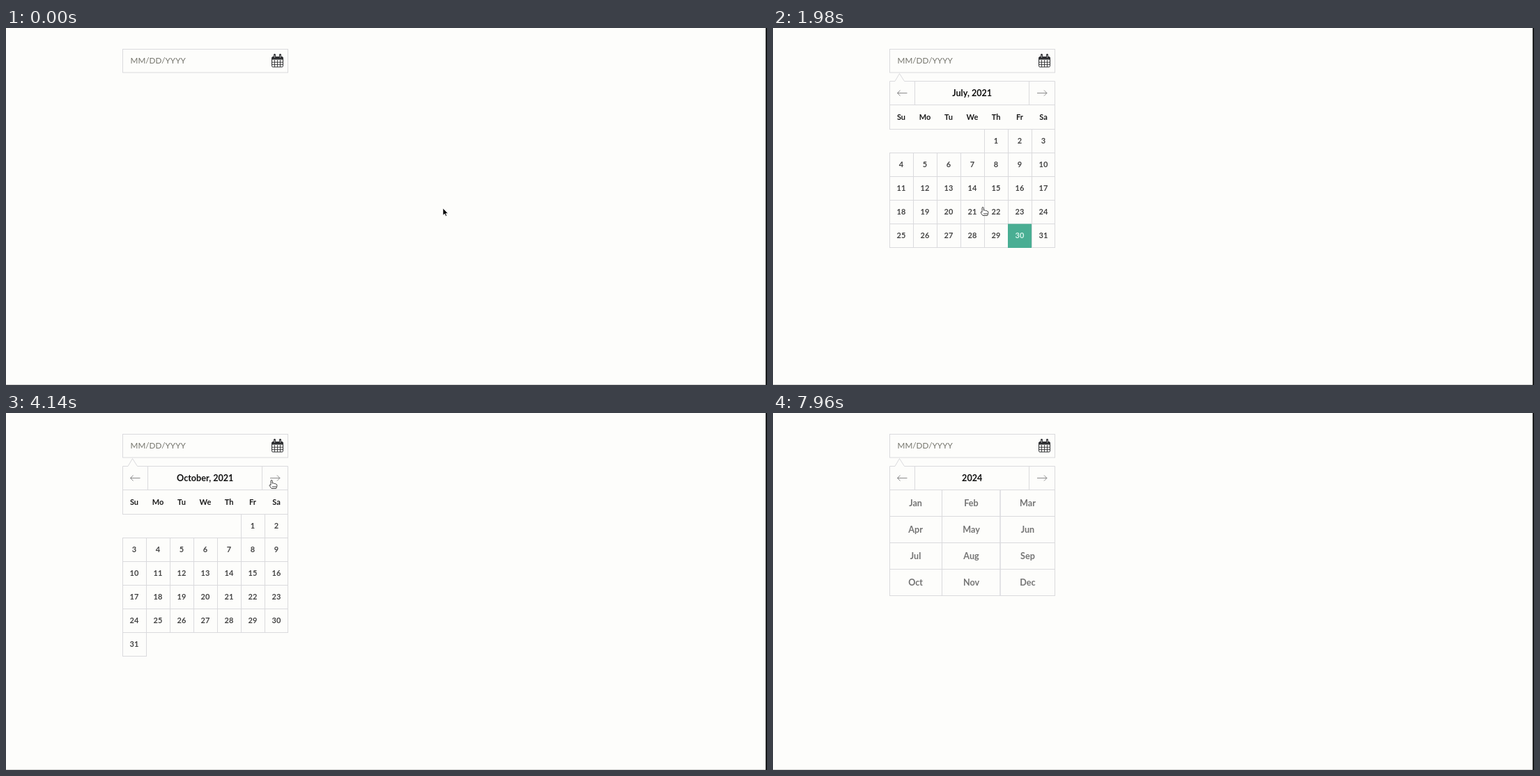
Animation of 1092 by 513 pixels, one loop 8000 ms. Source, as an HTML page:

```html
<!DOCTYPE html>
<html lang="en">
<head>
<meta charset="utf-8">
<title>Date picker</title>
<style>
  html, body { margin: 0; width: 100%; height: 100%; overflow: hidden; background: #fdfdfb; }
  svg { display: block; width: 1092px; height: 513px; font-family: Lato, "Noto Sans", sans-serif; }
  text { text-anchor: middle; font-weight: 700; }
  .line { fill: none; stroke: #dadadd; }
  .icon { fill: none; stroke: #8b8b8b; }
  .active { fill: #49ae93; }
  .title { font-size: 12.6px; fill: #111; }
  .weekday { font-size: 11px; fill: #1c1c1c; }
  .day { font-size: 11px; fill: #444; }
  .month { font-size: 12.6px; fill: #747474; }
  text.on { fill: #d9f5ec; }
  .placeholder { font-size: 11.7px; font-weight: 400; fill: #74746c; text-anchor: start; }
</style>
</head>
<body>
<svg viewBox="0 0 1092 513">
  <rect y="512" width="1092" height="1" fill="#d2d2d0"/>
  <rect x="1090" width="2" height="513" fill="#1d1f20"/>

  <rect class="line" x="167.5" y="30.5" width="237" height="33.5"/>
  <text class="placeholder" x="178.6" y="51.3">MM/DD/YYYY</text>
  <g fill="none" stroke="#2f3033">
    <rect x="381.5" y="41.5" width="16" height="14.5" rx="1.5"/>
    <path d="M382 43.5H397" stroke-width="4"/>
    <path d="M385.5 46V56M389.5 46V56M393.5 46V56M382 49.2H397M382 52.6H397" stroke-width=".9"/>
    <path d="M385.5 38.5V43M393.5 38.5V43" stroke-width="3" stroke-linecap="round"/>
    <path d="M385.5 39V42.5M393.5 39V42.5" stroke="#ddd" stroke-width=".8"/>
  </g>

  <g id="popup">
    <path class="line" d="M167.5 110.5V76.5H175L181.5 65.5 188.5 76.5H404.5V110.5ZM203.5 76V110M367.5 76V110"/>
    <path class="icon" d="M192.5 93.5H178.5M182.5 89.5L178.5 93.5 182.5 97.5M379 93.5H393M389 89.5L393 93.5 389 97.5"/>
    <g id="view"></g>
  </g>

  <g id="cursor">
    <path id="arrow" d="M0 0V10.2L2.4 8 4 11.4 5.6 10.6 4.1 7.4H7.2Z" fill="#000" stroke="#fff" stroke-width=".7"/>
    <path id="beam" d="M-2.5 -5H-1L0 -4 1 -5H2.5M0 -4V4M-2.5 5H-1L0 4 1 5H2.5M-1.5 1H1.5" fill="none" stroke="#333" stroke-width="1"/>
    <path id="hand" d="M-1 1.2Q0 -.5 1.2 1.2V5L3.3 4.8 4 5.6 5.5 5.4 6.2 6.3Q7.8 6 7.8 7.5V9.6L6.6 12.5H0L-2.9 8.4Q-3 6.4 -1 7.6ZM2 9V11M4 9V11M6 9V11" fill="#fff" stroke="#303030" stroke-width=".9" stroke-linejoin="round"/>
  </g>
</svg>
<script>
const LOOP = 8000;
const LEFT = 167.5, CELL = 34;
const $ = id => document.getElementById(id);

// start time, year, month index (none for the year view)
const views = [
  [1280, 2021, 6], [2710, 2021, 7], [3460, 2021, 8], [4140, 2021, 9],
  [4810, 2021], [5880, 2022], [6540, 2023], [7310, 2024]
];

// first step, last step, number of steps, waypoints
const moves = [
  [0, 0, 1, [627, 259]],
  [80, 80, 1, [612, 252]],
  [310, 600, 5, [205, 42], [221, 54]],
  [770, 990, 4, [234, 57]],
  [1620, 1620, 1, [235, 61]],
  [1681, 2410, 13, [250, 200], [345, 306], [385, 200], [379, 100]],
  [2480, 2560, 2, [381, 96]],
  [4330, 4620, 5, [308, 97]],
  [5190, 5700, 8, [384, 92]]
];
const CURSOR_OUT = 7960;

const label = (cls, x, y, s) => `<text class="${cls}" x="${x}" y="${y}">${s}</text>`;
const box = (cls, x, y, w, h) => `<rect class="${cls}" x="${x}" y="${y}" width="${w}" height="${h}"/>`;
const monthName = (m, style) => new Date(2021, m, 1).toLocaleString('en-US', { month: style });

function daysView(year, month) {
  const offset = new Date(year, month, 1).getDay();
  const count = new Date(year, month + 1, 0).getDate();
  let out = label('title', 285.7, 97.5, `${monthName(month, 'long')}, ${year}`);
  out += box('line', LEFT, 110.5, 237, 35);
  ['Su', 'Mo', 'Tu', 'We', 'Th', 'Fr', 'Sa'].forEach((name, i) =>
    out += label('weekday', 184 + i * CELL, 131.7, name));
  for (let day = 1; day <= count; day++) {
    const cell = offset + day - 1;
    const col = cell % 7, row = Math.floor(cell / 7);
    const x = LEFT + col * CELL, y = 145.5 + row * CELL;
    const today = year === 2021 && month === 6 && day === 30;
    out += box('line', x, y, col === 6 ? 33 : CELL, CELL);
    if (today) out += box('active', x - .5, y, CELL, CELL + .5);
    out += label(today ? 'day on' : 'day', 184 + col * CELL, 165.8 + row * CELL, day);
  }
  return out;
}

function yearView(year) {
  const edges = [LEFT, 242.5, 326, 404.5], centers = [204.6, 284.5, 365.5];
  let out = label('title', 285.7, 97.5, year);
  for (let m = 0; m < 12; m++) {
    const col = m % 3, row = Math.floor(m / 3);
    const x = edges[col], y = 110.5 + row * 38, w = edges[col + 1] - x;
    const on = year === 2021 && m === 6;
    out += box('line', x, y, w, 38);
    if (on) out += box('active', x - .5, y + .5, w, 37);
    out += label(on ? 'month on' : 'month', centers[col], 133.5 + row * 38, monthName(m, 'short'));
  }
  return out;
}

function cursorAt(t) {
  let pos = moves[0][3];
  for (const [start, end, steps, ...points] of moves) {
    if (t < start) break;
    const done = steps === 1 ? 1 :
      Math.min(steps, Math.floor((t - start) * (steps - 1) / (end - start) + 1e-6) + 1);
    const path = [pos, ...points];
    const u = done / steps * points.length;
    const i = Math.min(points.length - 1, Math.floor(u));
    pos = path[i].map((v, k) => v + (path[i + 1][k] - v) * (u - i));
  }
  return pos;
}

function cursorKind([x, y]) {
  if (x < 167 || x > 405) return 'arrow';
  if (y > 30 && y < 64) return 'beam';
  return y > 76 ? 'hand' : 'arrow';
}

let shown = null;
function draw(t) {
  const view = views.filter(v => v[0] <= t).pop();
  $('popup').style.opacity = !view ? 0 : t < 1310 ? .5 : 1;
  if (view && view !== shown) {
    const [, year, month] = view;
    $('view').innerHTML = month === undefined ? yearView(year) : daysView(year, month);
    shown = view;
  }
  const pos = cursorAt(t), kind = cursorKind(pos);
  $('cursor').setAttribute('transform', `translate(${pos.map(Math.round)})`);
  for (const id of ['arrow', 'beam', 'hand'])
    $(id).style.display = id === kind && t < CURSOR_OUT ? '' : 'none';
}

const origin = performance.now();
function tick() {
  draw((performance.now() - origin) % LOOP);
  requestAnimationFrame(tick);
}
tick();
</script>
</body>
</html>
```
